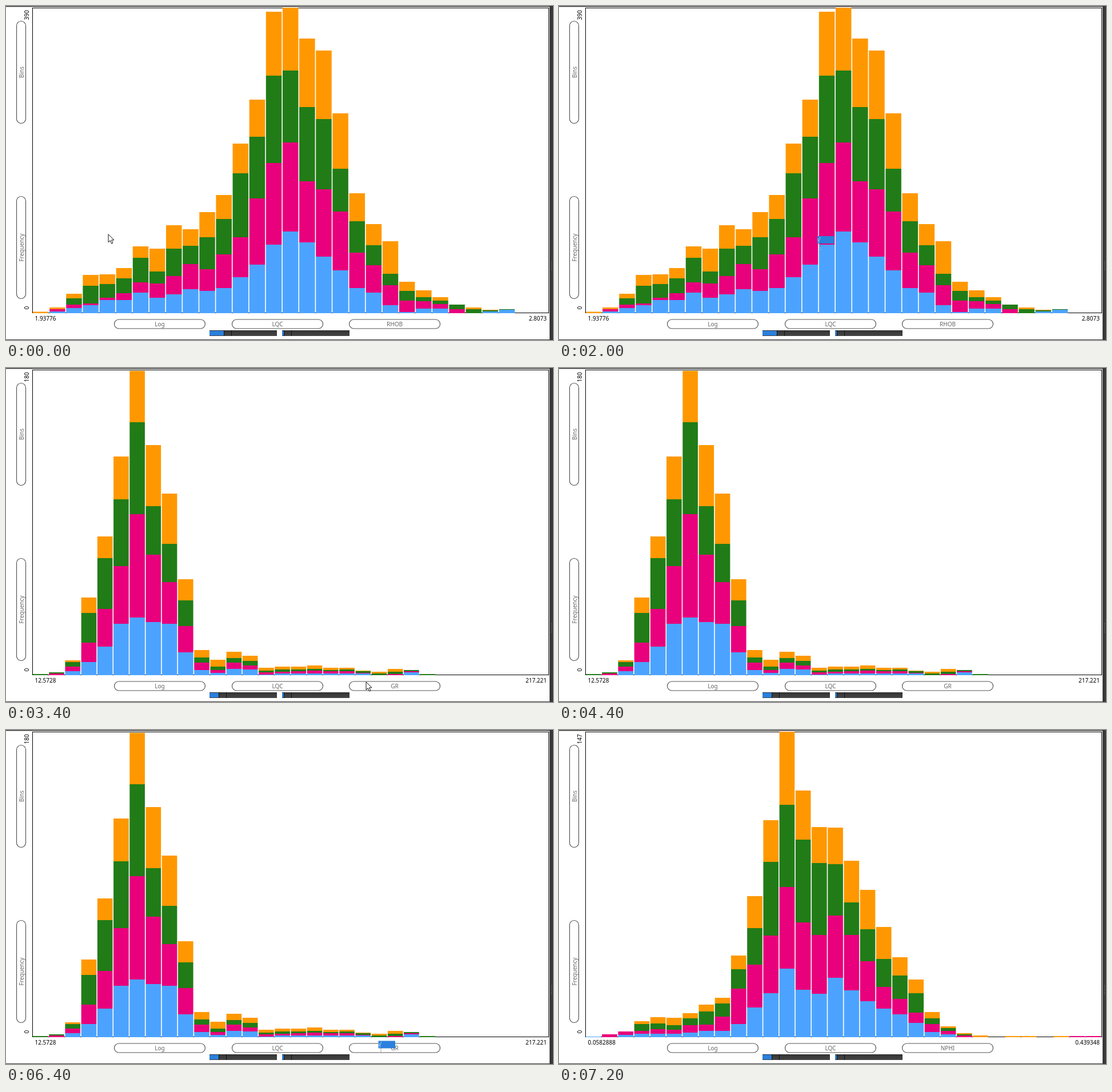
Recreate the animation shown at these times as an HTML page. Size 957x585 px, loop 8000 ms.

```html
<!DOCTYPE html>
<html lang="en">
<head>
<meta charset="utf-8">
<title>Stacked histogram</title>
<style>
html, body { margin: 0; width: 100%; height: 100%; overflow: hidden; background: #fff; }
svg { display: block; width: 957px; height: 585px; }
text { font: 10px "Noto Sans", "Open Sans", sans-serif; }
.pill { fill: #fff; stroke: #555; stroke-width: 1.2; }
.label { fill: #666; text-anchor: middle; }
</style>
</head>
<body>
<svg id="stage" viewBox="0 0 957 585" xmlns="http://www.w3.org/2000/svg">
  <defs>
    <linearGradient id="track" x2="0" y2="1">
      <stop stop-color="#333"/><stop offset="1" stop-color="#464646"/>
    </linearGradient>
  </defs>
  <rect width="957" height="585" fill="#fff"/>
  <rect width="957" height="1.5" fill="#3a3a3a"/>
  <rect y="584" width="957" height="1" fill="#3a3a3a"/>
  <rect x="951" width="6" height="585" fill="#383838"/>
  <path d="M954.5 447v17" stroke="#888" stroke-dasharray="1 2"/>
  <rect x="46.5" y="3.5" width="903" height="534" fill="#fff" stroke="#000"/>
  <g id="bars"></g>
  <g id="controls"></g>
  <text id="top" transform="translate(40 24.5) rotate(-90)"></text>
  <text transform="translate(40 531.5) rotate(-90)">0</text>
  <text id="min" x="50.5" y="551"></text>
  <text id="max" x="946" y="551" text-anchor="end"></text>
  <g id="drag">
    <rect width="29.5" height="13" fill="#2a80dc"/>
    <path d="M5 2L3.5 7L2.5 12M1.5 4V10" fill="none" stroke="#e8f2ff" stroke-width="1" stroke-dasharray="2 1"/>
    <path d="M3.5 14v7M5.5 20v6" stroke="#fff" stroke-dasharray="1 2"/>
    <path d="M4.5 13v10" stroke="#222" stroke-dasharray="1 1.5"/>
  </g>
  <path id="arrow" d="M1 .8V14.8L4.2 11.8L6.6 17.2L8.9 16.2L6.6 10.9H11Z" fill="#fff" stroke="#111" stroke-width="1"/>
</svg>
<script>
const $ = id => document.getElementById(id);
const BASE = 538, LEFT = 47, WIDTH = 903, LOOP = 8000;
const COLORS = ["#4ca3ff", "#e8007c", "#217c17", "#ff9800"];

// Each layer holds the stacked height in pixels, bar by bar.
const charts = [
  { name: "RHOB", top: "390", min: "1.93776", max: "2.8073", bins: 31, fill: 25, layers: [
    [0,3,9,14,23,23,36,27,33,42,39,44,63,85,120,143,124,99,75,44,36,14,2,8,8,0,0,3,6],
    [0,7,15,17,27,35,54,52,65,86,77,103,133,201,263,299,231,217,178,106,84,49,22,21,16,7,0,3,6],
    [0,7,26,48,51,61,97,73,113,118,133,165,245,309,416,425,361,340,253,161,119,69,39,28,22,15,7,5,7],
    [2.5,10,34,67,68,79,117,113,154,147,177,207,297,374,528,535,481,460,350,210,156,126,55,40,28,15,10,6,7]
  ] },
  { name: "GR", top: "180", min: "12.5728", max: "217.221", bins: 32, fill: 16, layers: [
    [0,0,7,23,50,90,101,93,90,40,9,4,11,10,1,3,3,3,3,3,3,0,0,5,0],
    [0,3,15,57,116,191,282,211,163,86,22,9,22,17,5,6,7,8,7,7,4,0,2,7,0],
    [2,5,23,109,205,308,443,296,230,131,31,15,30,25,8,10,10,11,9,10,7,3,6,9,2],
    [2,5,26,136,243,383,533,403,318,168,44,27,41,34,13,15,15,17,13,13,8,6,11,9,2]
  ] },
  { name: "NPHI", top: "147", min: "0.0582888", max: "0.439348", bins: 32, fill: 16, layers: [
    [1,0,4,6,6,6,8,11,11,23,52,77,120,83,76,104,82,63,50,40,25,9,5,0],
    [1,5,10,11,14,13,21,22,36,85,127,178,263,201,179,213,179,133,88,67,43,23,11,3,0,0,0,0,0,0,2,2],
    [1,5,10,23,24,21,33,45,59,119,191,307,407,346,305,303,236,189,137,108,77,33,16,5,0,0,0,0,0,0,2,2],
    [1,5,10,28,35,34,42,57,69,143,247,380,535,432,368,367,309,258,193,140,101,44,19,7,3,0,2,2,0,2,2,2]
  ] }
];

// Pointer steps: start time, kind, left, top. The pointer jumps, it does not glide.
const steps = [
  [0, "arrow", 178, 399], [200],
  [2000, "drag", 452, 403], [2200, "drag", 566, 506], [2400, "drag", 582, 536],
  [2600, "drag", 608.5, 539], [2800, "drag", 616.5, 545],
  [3400, "arrow", 629, 549], [3800, "arrow", 363, 399], [4000, "arrow", 220, 373],
  [4200, "arrow", 323, 346], [4400],
  [5600, "drag", 501.5, 514], [5800, "drag", 575.5, 497], [6000, "drag", 661, 547],
  [6200, "drag", 661.5, 547], [6400, "drag", 651.5, 544.5],
  [6800, "arrow", 679, 554], [7000, "arrow", 576, 554], [7200]
];

const rect = (x, y, w, h, fill) =>
  `<rect x="${x}" y="${y}" width="${w}" height="${h}" fill="${fill}"/>`;

function pill(x, text, id = "") {
  return `<rect class="pill" x="${x}" y="549" width="159" height="16" rx="8"/>
    <text class="label" id="${id}" x="${x + 79.5}" y="561">${text}</text>`;
}

function sidePill(y, text) {
  return `<rect class="pill" x="18.5" y="${y}" width="16" height="179" rx="8"/>
    <text class="label" transform="translate(30.7 ${y + 89.5}) rotate(-90)">${text}</text>`;
}

function slider(x, id, fill) {
  return rect(x, 568, 118, 10, "url(#track)") +
    `<rect id="${id}" x="${x}" y="569" width="${fill}" height="8" fill="#2a80dc"/>
    <path id="${id}Knob" d="M.5 568v10M13.5 568v10" stroke="#111" transform="translate(${x + fill})"/>`;
}

function barMarkup({ bins, layers }) {
  const pitch = WIDTH / bins;
  return layers.map((layer, k) => layer.map((height, i) => {
    const below = k ? layers[k - 1][i] || 0 : 0;
    return height > below
      ? rect(LEFT + i * pitch, BASE - height, pitch - 1.6, height - below, COLORS[k]) : "";
  }).join("")).join("");
}

$("controls").innerHTML = sidePill(26.5, "Bins") + sidePill(333.5, "Frequency") +
  pill(189.5, "Log") + pill(395.5, "LQC") + pill(600.5, "", "name") +
  slider(356, "binFill", 25) + slider(483, "spareFill", 3);

let shown = null;
function showChart(chart) {
  if (chart === shown) return;
  shown = chart;
  $("bars").innerHTML = barMarkup(chart);
  for (const key of ["name", "top", "min", "max"]) $(key).textContent = chart[key];
  $("binFill").setAttribute("width", chart.fill);
  $("binFillKnob").setAttribute("transform", `translate(${356 + chart.fill})`);
}

function render(now) {
  const t = now % LOOP;
  showChart(charts[t < 3400 ? 0 : t < 6800 ? 1 : 2]);
  const [, kind, x, y] = steps.filter(step => step[0] <= t).pop();
  for (const id of ["arrow", "drag"]) {
    $(id).setAttribute("visibility", id === kind ? "visible" : "hidden");
    if (id === kind) $(id).setAttribute("transform", `translate(${x} ${y})`);
  }
}

const start = performance.now();
function tick() {
  render(performance.now() - start);
  requestAnimationFrame(tick);
}
tick();
</script>
</body>
</html>
```
